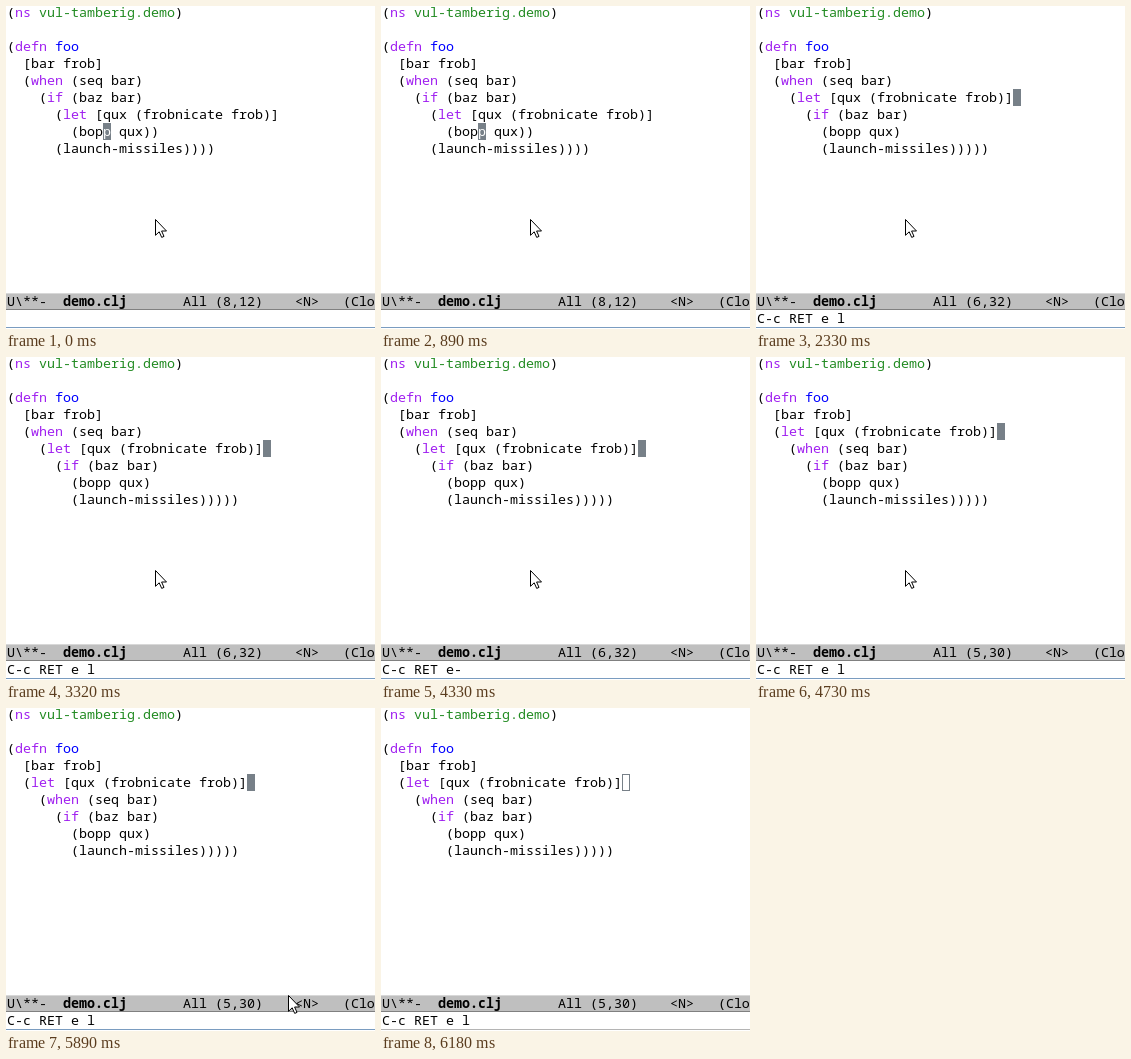
Animation of 369x323 px, one loop 6220 ms. Source, as an HTML page:

```html
<!DOCTYPE html>
<html lang="en">
<head>
<meta charset="utf-8">
<title>Editor demo</title>
<style>
  html, body { margin: 0; width: 100%; height: 100%; overflow: hidden; background: #fff; }
  svg { display: block; width: 369px; height: 323px; }
  text { font: 13.3333px "Noto Sans Mono", "DejaVu Sans Mono", monospace; white-space: pre; fill: #000; }
  .keyword { fill: #a020f0; }
  .name { fill: #0000ff; }
  .namespace { fill: #228b22; }
  .bold { font-weight: bold; }
</style>
</head>
<body>
<svg viewBox="0 0 369 323">
  <rect width="369" height="323" fill="#fff"/>
  <g id="code"></g>
  <g id="caret">
    <rect id="block" width="8" height="17" fill="#778088"/>
    <rect id="hollow" x=".5" y=".5" width="7" height="16" fill="none" stroke="#778088"/>
    <text id="under" y="13" style="fill:#fff"></text>
  </g>
  <rect y="287" width="369" height="17" fill="#bfbfbf"/>
  <rect y="287" width="369" height="1" fill="#d8d8d8"/>
  <rect y="303" width="369" height="1" fill="#808080"/>
  <text id="mode" x="1" y="300"></text>
  <text id="echo" x="1" y="317"></text>
  <rect id="edge" y="321" width="369" height="1"/>
  <path id="mouse" d="M.5 .5V16.3L4.2 12.8 6.7 18.4 9 17.4 6.6 12H11.5Z" fill="#fff" stroke="#000"/>
</svg>
<script>
const LOOP = 6220, CELL = 8, ROW = 17;
const $ = id => document.getElementById(id);

const binding = "(let [qux (frobnicate frob)]";
const head = ["(ns vul-tamberig.demo)", "", "(defn foo", "  [bar frob]"];
const moved = ["      (if (baz bar)", "        (bopp qux)", "        (launch-missiles)))))"];

const views = [
  { col: 12, row: 7, pos: "8,12", under: "p", lines: [...head,
    "  (when (seq bar)", "    (if (baz bar)", "      " + binding,
    "        (bopp qux))", "      (launch-missiles))))"] },
  { col: 32, row: 5, pos: "6,32", under: "", lines: [...head,
    "  (when (seq bar)", "    " + binding, ...moved] },
  { col: 30, row: 4, pos: "5,30", under: "", lines: [...head,
    "  " + binding, "    (when (seq bar)", ...moved] }
];

// Each track lists [start time, value]; values hold until the next entry.
const viewTrack = [[0, 0], [2330, 1], [4730, 2]];
const caretTrack = [[0, "on"], [440, "off"], [890, "on"], [1320, "off"], [1910, "on"],
  [2740, "off"], [3320, "on"], [3760, "off"], [4330, "on"], [5170, "off"],
  [5740, "on"], [6180, "hollow"]];
const echoTrack = [[0, ""], [1320, "C-c RET-"], [1600, "C-c RET e-"], [2330, "C-c RET e l"],
  [3760, "C-c RET-"], [4050, "C-c RET e-"], [4730, "C-c RET e l"]];
const mouseTrack = [[0, [149, 213]], [5590, [234, 252]], [5740, [317, 301]],
  [5890, [282, 287]], [6180, null]];

const at = (track, t) => track.findLast(([start]) => start <= t)[1];
const span = (cls, s) => `<tspan class="${cls}">${s}</tspan>`;
const show = (el, visible) => el.setAttribute("visibility", visible ? "visible" : "hidden");

const highlight = line => line
  .replace(/\((ns|defn|when|if|let)( \S+)?/, (all, word, rest = "") => {
    if (word === "ns") rest = " " + span("namespace", rest.slice(1, -1)) + ")";
    if (word === "defn") rest = span("name", rest);
    return "(" + span("keyword", word) + rest;
  });

let shown = -1;
function drawView(index) {
  if (index === shown) return;
  shown = index;
  const { col, row, pos, under, lines } = views[index];
  $("code").innerHTML = lines
    .map((line, i) => `<text x="1" y="${i * ROW + 11}">${highlight(line)}</text>`).join("");
  $("caret").setAttribute("transform", `translate(${1 + col * CELL} ${row * ROW - 2})`);
  $("under").textContent = under;
  $("mode").innerHTML = `U\\**-  ${span("bold", "demo.clj")}       All (${pos})    &lt;N&gt;   (Clo`;
}

function draw(t) {
  drawView(at(viewTrack, t));
  const caret = at(caretTrack, t), mouse = at(mouseTrack, t);
  show($("block"), caret === "on");
  show($("under"), caret === "on");
  show($("hollow"), caret === "hollow");
  $("echo").textContent = at(echoTrack, t);
  $("edge").setAttribute("fill", caret === "hollow" ? "#b4b4b4" : "#7a9cc0");
  show($("mouse"), mouse);
  if (mouse) $("mouse").setAttribute("transform", `translate(${mouse})`);
}

const begin = performance.now();
function tick() {
  draw((performance.now() - begin) % LOOP);
  requestAnimationFrame(tick);
}
tick();
</script>
</body>
</html>
```
